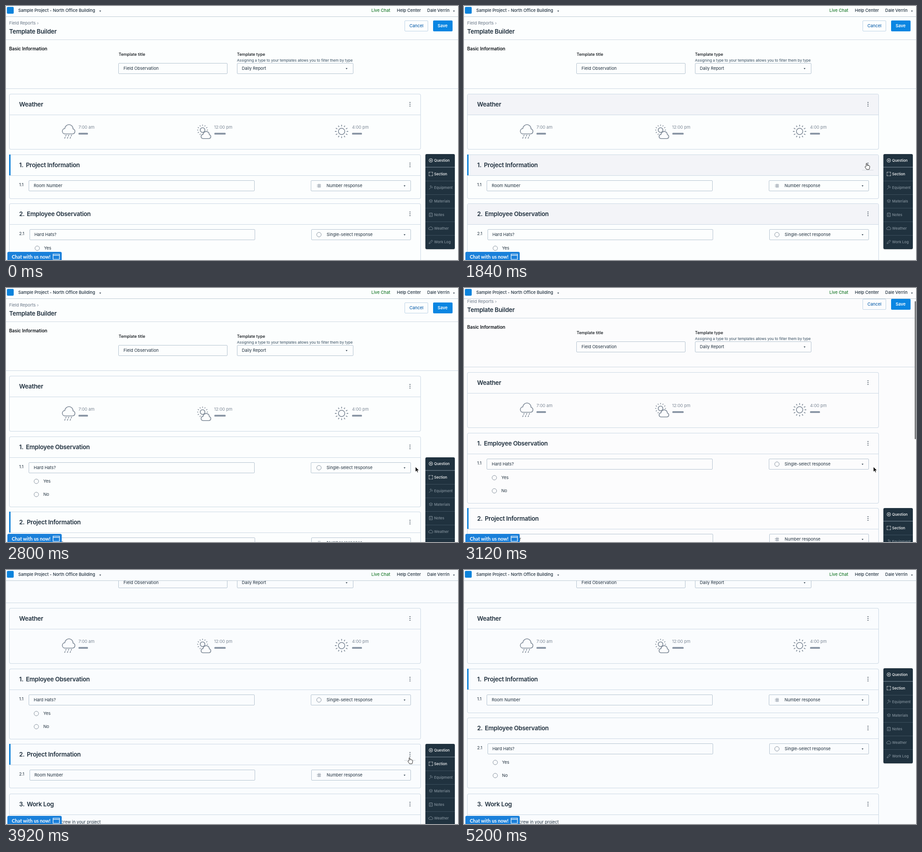
An HTML page for the animation above (5.36 s loop, 998 px wide and 561 px high).

```html
<!DOCTYPE html>
<html lang="en">
<head>
<meta charset="utf-8">
<title>Template Builder</title>
<style>
html, body { margin: 0; width: 100%; height: 100%; overflow: hidden; }
#stage {
  position: relative; width: 998px; height: 561px; overflow: hidden;
  background: #fcfefe; color: #1f2f3d;
  font: 400 9.33px/20px Inter, "Liberation Sans", sans-serif;
}
#stage div, #stage svg, .t { position: absolute; box-sizing: border-box; }
svg { fill: none; stroke: currentColor; overflow: visible; }
.t { white-space: pre; }
.m { font-weight: 500; }
.b { font-weight: 600; }
.h { font-weight: 600; font-size: 13.33px; letter-spacing: -.017em; }
.basic { font-weight: 600; font-size: 9.95px; color: #0a0f14; }
.label { font-weight: 500; font-size: 9.1px; color: #0a0f14; }
.hint { font-size: 8.05px; color: #31495c; }
.soft { color: #7b8795; }
#page, .order { left: 0; top: 0; width: 998px; height: 0; }
#top { left: 0; top: 0; width: 998px; height: 24px; background: inherit; border-bottom: 1px solid #bfcbd5; }
#logo { left: 2px; top: 2px; width: 15px; height: 15px; border-radius: 2px; background: #0c83dc; }
.rule { left: 0; width: 998px; height: 1px; background: #cdd8e2; }
.card { left: 7px; width: 909px; border-radius: 4px; box-shadow: inset 0 0 0 1px #cbd8e4; }
.head { left: 1px; top: 1px; width: 907px; height: 46px; border-bottom: 1px solid #cbd8e4; border-radius: 3px 3px 0 0; }
.bar { left: 0; top: 0; width: 3px; height: 46px; background: #0b7fd8; }
.field { height: 24px; border: 1px solid #b4c3d0; border-radius: 2px; }
.caret { width: 0; height: 0; border: solid transparent; border-width: 3px 2.5px 0; border-top-color: #44535f; }
.chip { height: 4px; border-radius: 1.5px; background: #8b97a6; }
.btn { top: 32px; height: 24px; border-radius: 2px; }
#tools {
  left: 926px; top: 327px; width: 65px; height: 210px; border-radius: 3px;
  background: #20323f; color: #82909b; font-size: 8px; font-weight: 500;
  box-shadow: 0 1px 2px #0003;
}
.on { color: #fff; }
.sep { left: 0; width: 65px; height: 1px; background: #3c4f5d; }
.sep.first { height: 2px; background: #526370; }
#chat {
  left: 3px; top: 543px; width: 120px; height: 18px; border-radius: 3px 3px 0 0;
  background: #1a80da; color: #fff; font: 700 10.7px/20px Lato, sans-serif;
}
#thumb { left: 995px; top: 24px; width: 3px; height: 305px; border-radius: 2px; background: #7d7f81; }
#hover { left: 879px; top: 362px; width: 25px; height: 1px; background: #d5dae0; }
#cursor { left: 0; top: 0; width: 0; height: 0; }
</style>
</head>
<body>
<div id="stage"></div>
<script>
const LOOP = 5360, STEP = 80;

// Markup helpers; x is a left edge, y a vertical centre.
const text = (x, y, s, cls = '') => `<span class="t ${cls}" style="left:${x}px;top:${y - 10}px">${s}</span>`;
const box = (x, y, w, h, cls) => `<div class="${cls}" style="left:${x}px;top:${y}px;width:${w}px;height:${h}px"></div>`;
const rule = y => `<div class="rule" style="top:${y}px"></div>`;
const caret = (x, y) => `<div class="caret" style="left:${x - 2.5}px;top:${y - 1.5}px"></div>`;
const icon = (x, y, d, cls = '', attrs = 'stroke-width="1"') =>
  `<svg class="${cls}" style="left:${x - 8}px;top:${y - 8}px" width="16" height="16" viewBox="-8 -8 16 16" ${attrs}><path d="${d}"/></svg>`;
const RING = 'M-5 0a5 5 0 1 0 10 0a5 5 0 1 0-10 0';
const HASH = 'M-1-4.5v9M2-4.5v9M-4.5-1.5h9M-4.5 2h9';
const ring = (x, y) => icon(x, y, RING, 'soft', 'stroke-width=".9"');
const dots = (x, y) => icon(x, y, 'M0-4h0M0 0h0M0 4h0', '', 'stroke="#40688c" stroke-width="1.9" stroke-linecap="round"');

const card = (y, h, body, active) =>
  `<div class="card" style="top:${y}px;height:${h}px"><div class="head"></div>${active ? '<div class="bar"></div>' : ''}${dots(884.5, 22.5)}${body}</div>`;

const title = (n, s) => text(22, 23, n + '.', 'h') + text(n === 1 ? 37 : 39, 22.5, s, 'h');

function question(n, label, kind, mark) {
  const s = n - 1, left = 43 + 2 * s;
  return text(22, 67, n + '.1') +
    box(left, 57, 499 - s, 24, 'field') + text(left + 11.3 - s * .6, 68.5, label) +
    box(666 + s, 57, 221 - s, 24, 'field') + icon(684, 69, mark, 'soft', 'stroke-width=".9"') +
    text(700.7 + s * .4, 68.5, kind) + caret(873, 69);
}

const project = (n, y) => card(y, 98,
  title(n, 'Project Information') + question(n, 'Room Number', 'Number response', HASH), true);

function employee(n, y) {
  const x = 60 + 1.5 * (n - 1);
  const option = (s, dy) => ring(x, dy) + text(x + 15.4, dy, s);
  return card(y, 156, title(n, 'Employee Observation') +
    question(n, 'Hard Hats?', 'Single-select response', RING) + option('Yes', 98.5) + option('No', 127.5));
}

const CLOUD = 'M129 282.5h18a5.6 5.6 0 0 0 1-11a9 9 0 0 0-18-1a6.1 6.1 0 0 0-1 12z';
const sun = (x, y, r, ray, len) =>
  `<circle cx="${x}" cy="${y}" r="${r}"/><circle cx="${x}" cy="${y}" r="${ray}" stroke-width="${len}" pathLength="12" stroke-dasharray=".26 .74" stroke-dashoffset=".13"/>`;
const sky = `<svg class="soft" style="left:-7px;top:-194px" width="998" height="320" stroke-width="1.6">
  <path d="${CLOUD}"/>
  <path d="M133 284.5l-4 9M139 284.5l-4 9M145 284.5l-4 9" stroke-dasharray="3.6 1.8"/>
  ${sun(434, 274, 5.2, 10.6, 2.8)}
  <path d="${CLOUD}" transform="translate(335 78) scale(.77 .76)" fill="#fcfdfe" stroke-width="2.1"/>
  ${sun(741, 277, 7, 12.8, 3.6)}
</svg>`;
const hour = (x, w, s) => text(x, 73.5, s, 'soft') + box(x, 86, w, 4, 'chip');
const weather = card(194, 123, text(22, 23, 'Weather', 'h') + sky +
  hour(153, 21, '7:00 am') + hour(452.5, 25, '12:00 pm') + hour(757, 22, '4:00 pm'));

const TOOLS = [
  ['Question', 'M-4 0a4 4 0 1 0 8 0a4 4 0 1 0-8 0M-2 0h4M0-2v4'],
  ['Section', 'M-4-2v-2h2M2-4h2v2M4 2v2h-2M-2 4h-2v-2M-.8-4h1.6M-.8 4h1.6M-4-.8v1.6M4-.8v1.6'],
  ['Equipment', 'M-4 4l4.5-4.5M-2-3l2-1.5 4 4-1.5 1.5z'],
  ['Materials', 'M0-3.5L4-1.5 0 .5-4-1.5zM-4 1L0 3 4 1'],
  ['Notes', 'M-3.5-3.5h7v7.5h-7zM-1.5-4.5v2M1.5-4.5v2M-1.5 0h3M-1.5 2h2'],
  ['Weather', 'M-2.5 3h5a2 2 0 0 0 .5-4a3.2 3.2 0 0 0-6-.6a2.3 2.3 0 0 0 .5 4.6z'],
  ['Work Log', 'M-4 4l.8-2.6 5.2-5.4 2 1.8-5.4 5.4z']
];
const tools = TOOLS.map(([name, d], i) => {
  const y = 14 + 30 * i, on = i < 2 ? 'on' : '';
  return icon(11.5, y, d, on, 'stroke-width=".9"') + text(19.3, y, name, on) +
    (i ? `<div class="sep ${i === 1 ? 'first' : ''}" style="top:${30 * i - (i === 1 ? 2 : 1)}px"></div>` : '');
}).join('');

stage.innerHTML = `
<div id="page">
  ${text(7, 38, 'Field Reports', 'm soft')}${text(68.5, 38, '›', 'soft')}
  ${text(7, 55.5, 'Template Builder', 'h')}
  <div class="btn" style="left:880px;width:52px;border:1px solid #bdd3e6"></div>${text(890.7, 43.5, 'Cancel', 'm" data-tone="link')}
  <div class="btn" style="left:943px;width:43px;background:#0a86e2"></div>${text(953, 43.5, 'Save', 'b on')}
  ${rule(74)}
  ${text(7, 93.5, 'Basic Information', 'basic')}
  ${text(248.7, 107.3, 'Template title', 'label')}
  ${box(248, 126, 241, 24, 'field')}${text(259.5, 137.5, 'Field Observation')}
  ${text(510, 107.3, 'Template type', 'label')}
  ${text(510, 120.2, 'Assigning a type to your templates allows you to filter them by type', 'hint')}
  ${box(510, 126, 257, 24, 'field')}${text(520.7, 137.5, 'Daily Report')}${caret(752.5, 138)}
  ${rule(182)}
  ${weather}
  <div class="order" id="projectFirst">${project(1, 328)}${employee(2, 436)}</div>
  <div class="order" id="employeeFirst">${employee(1, 328)}${project(2, 494)}</div>
  ${card(604, 200, title(3, 'Work Log') + text(114.5, 63, 'crew in your project'))}
  <div id="tools">${tools}</div>
</div>
<div id="thumb"></div>
<div id="top">
  <div id="logo"></div>
  ${text(27, 10.3, 'Sample Project - North Office Building', 'm')}${caret(208, 11)}
  <span class="t m" style="left:806.7px;top:.3px;color:#1c7a2c">Live Chat</span>
  ${text(863, 10.3, 'Help Center', 'm')}${text(930, 10.3, 'Dale Verrin', 'm')}${caret(989.5, 11)}
</div>
<div id="chat">${text(9.7, 10.5, 'Chat with us now!')}
  ${icon(107.5, 11, 'M-7-6h14v11.5h-14zM-7-3.4h14', '', 'stroke-width="1.2"')}</div>
<div id="hover"></div>
<div id="cursor">
  <svg id="arrow" width="10" height="14"><path d="M0 0v11l2.6-2.4 1.7 3.9 1.8-.8-1.7-3.8h3.4z" fill="#000" stroke="#fff" stroke-width=".7"/></svg>
  <svg id="hand" width="10" height="14"><path d="M-1 7V1.2a1 1 0 0 1 2 0V5l1-.4 1 .6 1-.2 1 .7h1l.8.9v3.2l-1.2 4.2h-5.6l-3.6-5.2c-.4-1 .8-1.6 1.6-.8z" fill="#fff" stroke="#111" stroke-width=".9"/></svg>
</div>`;
document.querySelector('[data-tone]').style.color = '#1767b0';

// keys: [ms, value]; "hard" holds each value, otherwise it advances every STEP ms.
function loop(el, prop, keys, hard = true) {
  const all = [...keys, [LOOP, keys[keys.length - 1][1]]];
  el.animate(all.map(([ms, value], i) => ({
    offset: ms / LOOP,
    [prop]: value,
    easing: hard || i === all.length - 1 ? 'step-end' : `steps(${(all[i + 1][0] - ms) / STEP})`
  })), { duration: LOOP, iterations: Infinity });
}
const move = (x, y) => `translate(${x}px, ${y}px)`;
// Shown from the first time, hidden from the second, and so on.
const show = (el, ...times) => loop(el, 'opacity', [[0, 0], ...times.map((ms, i) => [ms, 1 - i % 2])]);
const hide = (el, ...times) => loop(el, 'opacity', [[0, 1], ...times.map((ms, i) => [ms, i % 2])]);

const scroll = [[0, 0], [3120, 8], [3200, 31], [3280, 61], [3360, 91], [3440, 110]];
loop(page, 'transform', scroll.map(([ms, y]) => [ms, move(0, -y)]));
loop(thumb, 'transform', scroll.map(([ms, y]) => [ms, move(0, Math.round(y * .57))]));
show(thumb, 3120, 3680);

hide(projectFirst, 2720, 4560);
show(employeeFirst, 2720, 4560);
loop(tools_(), 'transform', [[0, 0], [2800, 47], [2880, 130], [2960, 167], [4640, 120], [4720, 37], [4800, 0]]
  .map(([ms, y]) => [ms, move(0, y)]));
function tools_() { return document.getElementById('tools'); }

loop(cursor, 'transform', [
  [0, 690, 76], [400, 690, 76], [640, 724, 113], [720, 724, 113], [880, 833, 211], [960, 833, 211],
  [1520, 889, 347], [2320, 889, 347], [2640, 904, 395], [3520, 904, 395],
  [3840, 891, 414], [4240, 891, 414], [4480, 900, 431]
].map(([ms, x, y]) => [ms, move(x, y)]), false);
show(cursor, 480, 4960);
show(hand, 1520, 2320, 3760, 4320);
hide(arrow, 1520, 2320, 3760, 4320);
show(hover, 1600, 2400, 3840, 4320);
loop(hover, 'transform', [[0, move(0, 0)], [3600, move(0, 58)]]);

// Section headers are tinted while the first menu button is in use.
document.querySelectorAll('.head').forEach(el =>
  loop(el, 'backgroundColor', [[0, 'transparent'], [1600, '#f3f4f8'], [2320, 'transparent']]));
loop(stage, 'backgroundColor', [[0, '#fcfefe'], [3120, '#fcfcfd'], [3600, '#fafcfe']]);
</script>
</body>
</html>
```
